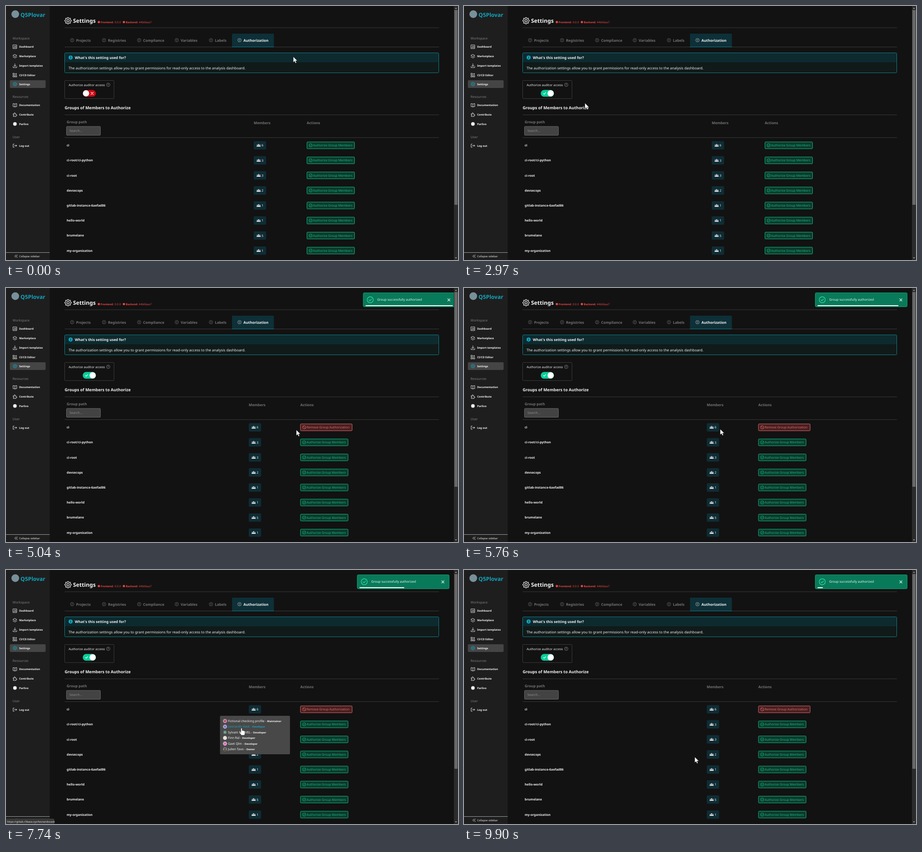
Recreate the animation shown at these times as an HTML page. Size 998 by 561 pixels, loop 9980 ms.

```html
<!DOCTYPE html>
<html lang="en">
<head>
<meta charset="utf-8">
<title>Authorization settings</title>
<style>
html, body { margin: 0; width: 100%; height: 100%; overflow: hidden; background: #121212; }
svg { display: block; width: 998px; height: 561px; }
text { font-family: "Noto Sans", "Open Sans", sans-serif; text-rendering: geometricPrecision; white-space: pre; }
</style>
</head>
<body>
<svg id="stage" viewBox="0 0 998 561" xmlns="http://www.w3.org/2000/svg"></svg>
<script>
const LOOP = 9980, STEP = 90;
const TEAL = '#12a5bd', GREEN = '#10b981', RED = '#e0696a', GREY = '#737373';

// Drawing helpers
const text = (x, y, s, size, fill = '#f4f4f4', weight = 700) =>
  `<text x="${x}" y="${y}" font-size="${size}" fill="${fill}" font-weight="${weight}">${s}</text>`;
const rect = (x, y, w, h, fill, r = 0, stroke = 'none') =>
  `<rect x="${x}" y="${y}" width="${w}" height="${h}" rx="${r}" fill="${fill}" stroke="${stroke}"/>`;
const circle = (x, y, r, fill, stroke = 'none', w = 1) =>
  `<circle cx="${x}" cy="${y}" r="${r}" fill="${fill}" stroke="${stroke}" stroke-width="${w}"/>`;
const line = (d, stroke = '#f0f0f0', w = 1, x = 0, y = 0) =>
  `<path d="${d}" transform="translate(${x} ${y})" fill="none" stroke="${stroke}" stroke-width="${w}" stroke-linecap="round" stroke-linejoin="round"/>`;
const group = (id, body, more = '') => `<g id="${id}" ${more}>${body}</g>`;
const rule = y => rect(129.5, y, 826.5, 1, '#3b3b3b');
const help = (x, y, c) => circle(x, y, 3.8, 'none', c, .8) +
  `<text x="${x}" y="${y + 2.1}" font-size="5.8" font-weight="700" fill="${c}" text-anchor="middle">?</text>`;

function gear(x, y, r, stroke, w) {
  let d = '';
  for (let i = 0; i < 32; i++) {
    const a = (i - .5) * Math.PI / 16, k = i % 4 < 2 ? r : r * .76;
    d += (i ? 'L' : 'M') + (Math.cos(a) * k).toFixed(2) + ' ' + (Math.sin(a) * k).toFixed(2);
  }
  return line(d + 'Z', stroke, w, x, y) + circle(x, y, r * .36, 'none', stroke, w);
}

// Sidebar
const icons = {
  board: 'M-4-4H4V4H-4ZM-2 2V0M0 2V-2M2 2V-1',
  layers: 'M0-4L4.3-1.6 0 .8-4.3-1.6ZM-4.3 1.4L0 3.9 4.3 1.4',
  load: 'M0-4.5V1.5M-2.5-1L0 1.5 2.5-1M-4 1.5V4H4V1.5',
  grid: 'M-4-4H-1V-1H-4ZM-4 1H-1V4H-4ZM1 1H4V4H1ZM2.5-4V-1M1-2.5H4',
  book: 'M0-2.5Q-1-3.5-4-3.5V3.2Q-1 3.2 0 4 1 3.2 4 3.2V-3.5Q1-3.5 0-2.5V4',
  puzzle: 'M-3.6-1.8H-1.5Q-2.2-4.3-.6-4.3T.3-1.8H2.4V.2Q4.6-.2 4.6 1.2T2.4 2.2V4H-3.6V2.2Q-1.8 2-1.8 1T-3.6 0Z',
  exit: 'M-1.5-3.5H-4V3.5H-1.5M-1.5 0H4M2-2L4 0 2 2'
};
const menu = [
  ['board', 90, 'Dashboard'], ['layers', 111, 'Marketplace'], ['load', 132, 'Import templates'],
  ['grid', 152.7, 'CI/CD Editor'], ['gear', 172.5, 'Settings'], ['book', 219, 'Documentation'],
  ['puzzle', 240, 'Contribute'], ['dot', 260.5, 'Parlivo'], ['exit', 308.5, 'Log out']
];
function sidebar() {
  let s = rect(0, 0, 96.5, 561, '#1e1e1e') + circle(20.5, 18, 8.5, '#78909a') +
    text(32, 24, 'Q5Plovar', 12.1, TEAL) + rect(8.5, 164, 79, 17, '#454545', 2);
  for (const [y, name] of [[73.8, 'Workspace'], [202.8, 'Resources'], [291.8, 'User']])
    s += text(14.5, y, name, 7.3, '#7e7e7e', 500);
  for (const [icon, y, name] of menu) {
    s += icon === 'gear' ? gear(19.7, y, 4.4, TEAL, .9)
      : icon === 'dot' ? circle(19.7, y, 4, '#f0f0f0') : line(icons[icon], '#f0f0f0', .9, 19.7, y);
    s += text(29, y + 2.1, name, 5.9);
  }
  return s + rect(0, 544, 96.5, 1, '#a0a0a0') + line('M-.3-2.8L-3 0-.3 2.8M2.9-2.8L.2 0 2.9 2.8', '#f0f0f0', .9, 22.3, 552.6) +
    text(29, 554.8, 'Collapse sidebar', 5.9, '#f4f4f4', 500);
}

// Page header, tabs, info panel, auditor card
const tabs = [[146, 'Projects'], [216.5, 'Registries'], [294, 'Compliance'], [377, 'Variables'], [452.5, 'Labels'], [515.5, 'Authorization']];
function header() {
  let s = gear(137, 32.5, 7.3, '#f0f0f0', 1.2) + text(148, 37.2, 'Settings', 12.2) +
    circle(205, 35.5, 2.5, '#f04444') + text(209, 37.5, 'Frontend:', 5.9, '#f04444') + text(240, 37.5, '0.0.0', 6.1, '#f04444', 400) +
    circle(260.3, 35.5, 2.5, '#f04444') + text(264.5, 37.5, 'Backend:', 5.9, '#f04444') + text(293.3, 37.5, '44b6baa7', 6.05, '#f04444', 400) +
    rule(47.5) + rule(90) + rect(499, 61, 92.5, 29.5, '#0e3038', 2) + rect(499, 90, 92.5, 1, '#137f8f');
  tabs.forEach(([x, name], i) => {
    const c = i === 5 ? '#f4f4f4' : GREY;
    s += help(x, 75.5, i === 5 ? '#b5bfc1' : GREY) + text(x + 8.7, 78.6, name, 8, c);
  });
  s += rect(129.5, 103.5, 826, 44, '#101a19', 2) + rect(130, 104, 825, 20.2, '#0d2a2f', 1.5) + rect(129.5, 103.5, 826, 44, 'none', 2, '#137e86') +
    circle(142.7, 113.8, 4.6, TEAL) + rect(142.1, 113, 1.3, 3.4, '#0d2a2f') + rect(142.1, 110.9, 1.3, 1.3, '#0d2a2f') +
    text(152, 116.8, "What's this setting used for?", 7.95) +
    text(138, 139.6, 'The authorization settings allow you to grant permissions for read-only access to the analysis dashboard.', 7.95, '#f4f4f4', 500);
  return s + rect(129.5, 164.5, 109, 40, 'none', 1, '#3b3b3b') +
    text(138.3, 176.6, 'Authorize auditor access', 6.95, '#f0f0f0', 500) + help(225.7, 174, '#8b8b8b') +
    rect(169.5, 185.5, 29, 14.8, '#cc0712', 7.4) +
    line('M-2.6-2.6L2.6 2.6M2.6-2.6L-2.6 2.6', '#fff', 1.1, 190.2, 193) +
    group('on', rect(169.5, 185.5, 29, 14.8, '#04cf9b', 7.4) + line('M-2.6 .2L-.8 2 2.8-1.8', '#fff', 1.1, 177.8, 193)) +
    group('ring', circle(177, 193, 8.3, 'none', '#fff', 1.2)) + group('knob', circle(176.7, 192.9, 6.9, '#fff'));
}

// Table
const rows = [['ci', 6], ['ci-root/ci-python', 3], ['ci-root', 3], ['devsecops', 2], ['gitlab-instance-6aefad86', 1],
  ['hello-world', 1], ['brumelane', 5], ['my-organization', 1]];
const rowY = i => 307.7 + 33.22 * i;
const people = [[-3, -.6, 1], [0, -1.6, 1.3], [3, -.6, 1]].map(([x, y, r]) => circle(x, y, r, '#f0f0f0')).join('') +
  '<path d="M-4.6 2.8V1.6Q-3.6 .3-2.4 1 0-1.2 2.4 1 3.6 .3 4.6 1.6V2.8Z" fill="#f0f0f0"/>';
const badge = (n, y) => rect(547, y - 9.3, 27.3, 18.6, '#0f2c34', 2.2) +
  `<g transform="translate(557.8 ${y})">${people}</g>` + text(564.2, y + 2.6, n, 7, '#f4f4f4', 500);
function button(y, w, label, c, bg, mark) {
  return rect(664.5, y - 7.5, w, 15, bg, 1.5, c) + '<g class="label">' + circle(672.7, y, 3.6, 'none', c, .9) +
    line(mark, c, .9, 672.7, y) + text(678, y + 2.5, label, 6.95, c, 500) + '</g>';
}
const allow = y => button(y, 105, 'Authorize Group Members', GREEN, '#0d3a2c', 'M-1.6 .1L-.4 1.3 1.7-1.1');
const remove = y => button(y, 114, 'Remove Group Authorization', RED, '#471f20', 'M-2.5-2.5L2.5 2.5');
function table() {
  const names = rows.map(([name], i) => text(134, rowY(i) + 2.4, name, 6.95)).join('');
  const counts = rows.map(([, n], i) => badge(n, rowY(i))).join('');
  const actions = rows.slice(1).map((_, i) => allow(rowY(i + 1))).join('');
  return text(129.5, 228, 'Groups of Members to Authorize', 8.98) + rule(239.8) + rule(290.2) +
    text(134, 258.9, 'Group path', 7.9, GREY) + rect(133.5, 266, 75, 19.5, '#434343', 1.5, '#666') +
    text(140, 278.4, 'Search...', 7.2, '#8c8c8c', 400) + names +
    group('members', text(547, 261, 'Members', 7.9, GREY) + counts) +
    group('actions', text(664, 261, 'Actions', 7.95, GREY) + actions + group('allow', allow(rowY(0))) + group('remove', remove(rowY(0))));
}

// Members popup
const team = [['Fictional checking profile', 'Maintainer', 'fictional', '#a8325e'], ['Leonardo Vask', 'Developer', 'leonardovask', '#6c63c8'],
  ['Sylvain BRUVEL', 'Developer', 'sylvainbruvel', '#2f6f57'], ['Finn Ral', 'Developer', 'finnral', '#e9e6da'],
  ['Gaet Qlm', 'Developer', 'gaetqlm', '#d65cae'], ['Julien Tavo', 'Owner', 'julientavo', '#8d8583']];
const teamY = i => 333.5 + 12.46 * i;
function avatar(i, c) {
  const y = teamY(i), x = 483.5;
  if (i === 5) return circle(x, y, 4.3, c) + circle(x, y - 1, 1.5, '#3b302c') + `<path d="M${x - 2.6} ${y + 3.3}Q${x} ${y - 1.5} ${x + 2.6} ${y + 3.3}Z" fill="#3b302c"/>`;
  if (i === 3) return circle(x, y, 4.3, c) + circle(x, y, 2.4, 'none', '#cfcabb', .6);
  const dark = i === 2;
  return circle(x, y, 4.3, dark ? '#30423b' : '#eee3ec') +
    line('M-2.6-2.6L2.6 2.6M2.6-2.6L-2.6 2.6M0-3.4V-2M0 2V3.4M-3.4 0H-2M2 0H3.4', dark ? '#7fb59d' : c, 1.3, x, y);
}
const popup = () => rect(472.5, 322, 154.5, 85, '#484848', 2) + team.map(([name, role, , c], i) => avatar(i, c) +
  `<text class="person" x="490" y="${teamY(i) + 2.4}" font-size="6.95" font-weight="500">${name} - <tspan font-size="5.65" font-weight="700">${role}</tspan></text>`).join('');

const toast = () => rect(775.5, 10.5, 203, 31, '#087a5a', 2.5, '#12986f') +
  circle(791, 26, 6.7, 'none', '#35e0a6', 1.2) + line('M-2.8 .2L-.8 2.3 3-1.9', '#35e0a6', 1.2, 791, 26) +
  text(806.5, 27.6, 'Group successfully authorized', 6.97, '#f4f4f4', 500) +
  line('M-2.6-2.6L2.6 2.6M2.6-2.6L-2.6 2.6', '#fff', 1.1, 964.6, 26.2) + '<rect id="bar" x="780.7" y="38" height="2" fill="#fff"/>';

const scrollbar = rect(989, 0, 9, 561, '#2b2b2b') + rect(990, 9, 7, 430, '#686868') +
  '<path d="M991.3 6.2L993.5 3.4 995.7 6.2ZM991.3 555.2L993.5 558 995.7 555.2Z" fill="#a0a0a0"/>';
const status = rect(-1, 550, 107, 12, '#363636', 2, '#4b4b4b') + '<text id="url" x="2.3" y="557.8" font-size="5.87" fill="#e4e4e4"></text>';
const arrow = '<path d="M0 0V12.4L2.9 9.8 4.9 14.2 7 13.2 5 9H9Z" fill="#fff" stroke="#111" stroke-width=".5"/>';
const hand = '<path d="M-1.4 1.2Q0-1 1.4 1.2V5.4Q2.8 4.7 3.7 6 5.2 5.2 6 6.7 7.6 6.2 7.7 8.2V11.4Q7.5 13.6 6.4 16H-.4Q-2.4 12.8-4.6 10 -4.3 7.8-1.4 9.8Z" fill="#fff" stroke="#111" stroke-width=".6"/>';

document.getElementById('stage').innerHTML = sidebar() + header() + table() + group('popup', popup()) + group('toast', toast()) +
  scrollbar + group('status', status) + group('cursor', group('arrow', arrow) + group('hand', hand));

const el = id => document.getElementById(id);
const show = (id, on) => el(id).style.display = on ? '' : 'none';
const shift = (id, x, y = 0) => el(id).setAttribute('transform', `translate(${x} ${y})`);
const clamp = v => Math.min(1, Math.max(0, v));
const persons = [...document.querySelectorAll('.person')];
const label = document.querySelector('#allow .label');

// Pointer track: time, x, y
const track = [
  [0, 634.3, 112], [180, 539, 104], [360, 632, 119], [540, 632, 119], [1170, 111, 172], [1620, 171, 200], [1710, 178.3, 197.5],
  [2790, 178.3, 197.5], [3240, 400, 240], [3780, 690, 304], [3960, 697.5, 305.5], [4500, 697.5, 305.5],
  [5040, 641, 313.5], [5490, 600, 318], [5850, 554.3, 309.5], [6750, 554.3, 309.5], [7110, 530, 331],
  [7560, 522, 343], [7920, 518, 355], [8190, 515, 368], [8460, 513, 381], [8730, 513, 400.5], [9090, 513, 400.5], [9270, 509.5, 413]
];
const handTimes = [[1710, 2970], [3780, 4590], [5850, 9180]];

function sample(keys, t, ease = k => k) {
  const i = keys.findIndex(k => k[0] > t);
  if (i < 0) return keys[keys.length - 1].slice(1);
  const a = keys[i - 1], b = keys[i], k = ease((t - a[0]) / (b[0] - a[0]));
  return a.slice(1).map((v, j) => v + (b[j + 1] - v) * k);
}
const easeOut = k => 1 - (1 - k) ** 3;
const bounce = [[4705, 1560], [5155, -13], [5267, 5], [5380, -2.6], [5455, 0]];

function render(t) {
  const [x, y] = sample(track, t), isHand = handTimes.some(([a, b]) => t >= a && t < b);
  shift('cursor', x, y);
  show('hand', isHand);
  show('arrow', !isHand);

  const flip = clamp((t - 2340) / 360);
  el('on').style.opacity = flip;
  shift('knob', 14.6 * flip);
  el('ring').style.opacity = t >= 1980 && t < 2430 ? .4 * clamp((2250 - t) / 270) : 0;

  const done = t >= 4680;
  shift('members', done ? -11 : 0);
  shift('actions', done ? -14.3 : 0);
  show('allow', !done);
  show('remove', done);
  label.style.opacity = 1 - .35 * clamp((t - 4050) / 180);

  show('toast', t >= bounce[0][0]);
  if (t >= bounce[0][0]) shift('toast', sample(bounce, t, easeOut)[0]);
  el('bar').setAttribute('width', Math.min(192.3, 149.3 - (t - 6480) * .0403));

  const open = t >= 5940 && t < 9450, over = open ? Math.floor((y - 327.3) / 12.46) : -1;
  show('popup', open);
  persons.forEach((p, i) => p.setAttribute('fill', i === over ? '#1aa3bd' : '#f4f4f4'));
  const who = team[over];
  show('status', who);
  if (who) el('url').textContent = 'https://gitlab.r3base.xyz/' + who[2];
}

function tick() {
  render(Math.floor(performance.now() % LOOP / STEP) * STEP);
  requestAnimationFrame(tick);
}
tick();
</script>
</body>
</html>
```
